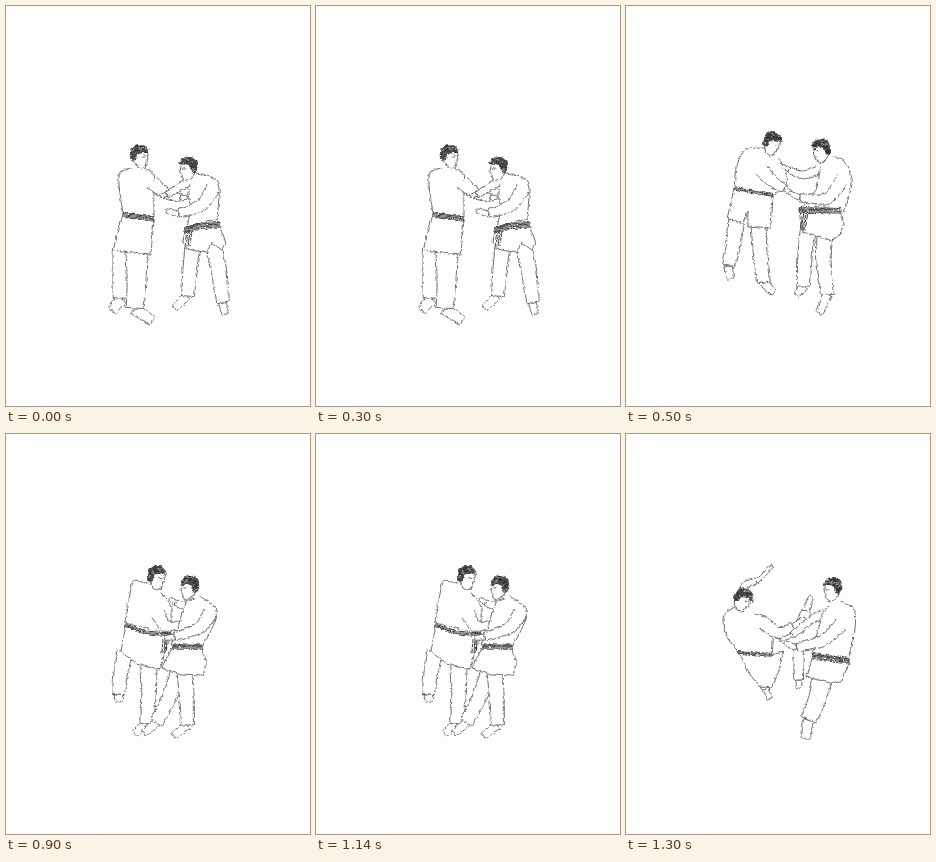
Recreate the animation shown at these times as an HTML page. Size 304x400 px, loop 1700 ms.

```html
<!DOCTYPE html>
<html lang="en">
<head>
<meta charset="utf-8">
<title>Judo throw</title>
<style>
  html, body { margin: 0; width: 100%; height: 100%; overflow: hidden; background: #fdfdfd; }
  svg { display: block; width: 100vw; height: 100vh; }
  .pose { opacity: 0; }
  path { fill: none; stroke: #666; stroke-width: .95; stroke-linecap: round; stroke-linejoin: round; }
  .ink { stroke-dasharray: 13 .9 6 1.1 21 1.4; }
  .paper { fill: #fdfdfd; stroke: none; }
  .hair { fill: #4a4a4a; stroke: none; }
  .dark { stroke: #2c2c2c; }
  .light { stroke: #ccc; stroke-width: .7; }
</style>
</head>
<body>
<svg id="stage" viewBox="0 0 304 400">
  <filter id="rough" filterUnits="userSpaceOnUse" x="0" y="0" width="304" height="400" color-interpolation-filters="sRGB">
    <feTurbulence baseFrequency=".18" numOctaves="2" seed="4"/>
    <feDisplacementMap in="SourceGraphic" scale="2" xChannelSelector="R" yChannelSelector="G"/>
  </filter>
</svg>
<script>
// Joints of each fighter. Head: place, tilt, side faced. Limbs: root, bend, end, tip.
// "back" and "front" run from neck to belt; the hem runs from the first belt end to the last.
const poses = [
  { hold: 500, fighters: [
    { head: ['133,150', 0, 1], back: '126,162 114,165 112,178 116,206', front: '138,162 147,168 147,186 147,210',
      belt: '116,208 147,212', knot: 5, hem: '106,244 135,247 144,248', trousers: 22,
      legs: ['117,245 116,268 115,292 106,304', '130,245 130,275 128,302 145,314'],
      arms: ['146,176 158,186 174,191 181,191'] },
    { head: ['182,162', 0, -1], front: '183,178 182,188 184,200 180,221', back: '190,167 206,171 213,182 211,212',
      belt: '178,224 190,220 213,218', tail: '183,224 181,240', knot: 6, hem: '176,235 180,242 201,246 205,236 215,243 219,238',
      legs: ['186,240 183,265 181,290 168,301', '207,240 213,268 216,296 218,307'],
      far: '190,172 174,180 160,188 154,190', arms: ['206,182 194,199 172,207 160,204'] }
  ]},
  { hold: 400, fighters: [
    { head: ['145,137', 22, 1], back: '138,141 119,143 111,156 108,182', front: '152,152 160,168 158,180 146,189',
      belt: '108,182 146,189', knot: 4, hem: '101,212 117,217 121,204 121,220 144,222',
      legs: ['110,212 107,236 102,259 104,272', '132,218 134,250 137,276 147,286'],
      arms: ['135,163 146,175 158,182 166,187'] },
    { head: ['195,144', -8, -1], front: '194,160 192,170 188,185 173,203', back: '207,150 219,156 225,176 217,206',
      belt: '173,203 214,204', tail: '179,205 176,224', knot: 6, hem: '176,226 188,229 204,234 214,228 217,218',
      legs: ['181,226 178,250 177,280 170,288', '198,228 197,255 201,288 193,306'],
      far: '191,164 176,168 163,163 156,160', arms: ['216,172 200,192 174,191 163,186'] }
  ]},
  { hold: 400, fighters: [
    { head: ['150,143', 8, 1], back: '141,149 127,147 122,165 119,188', front: '154,158 164,170 165,186 164,200',
      belt: '119,190 140,198 164,200', knot: 3.5, hem: '114,217 130,229 153,235',
      legs: ['119,216 114,240 112,260 113,267', '142,232 142,260 140,289 129,299'],
      arms: ['152,180 160,192 172,190 178,187'] },
    { head: ['183,153', 0, -1], front: '180,168 176,178 172,192 164,210', back: '193,162 208,172 209,184 196,211',
      belt: '166,212 195,212', tail: '158,205 157,218', knot: 5, hem: '155,234 175,240 196,241 200,228',
      legs: ['172,236 163,262 150,288 138,298', '178,238 180,265 181,291 167,301'],
      far: '190,168 178,171 169,168 164,164', arms: ['203,180 192,194 168,202 158,203'] }
  ]},
  { hold: 400, fighters: [
    { head: ['116,165', 30, 1], back: '108,172 98,180 99,198 112,218', front: '128,179 141,184 146,200 145,221',
      belt: '112,218 145,221', knot: 4, hem: '122,238 133,252 145,253 152,236 157,216', trousers: 11,
      legs: ['134,240 137,248 139,254 143,264', '172,212 172,232 172,246 172,253', '171,196 176,186 180,177 184,162'],
      far: '116,160 119,150 130,147 145,132', arms: ['136,188 152,198 166,192 178,184'] },
    { head: ['206,155', 0, -1], front: '202,172 196,180 190,200 186,220', back: '214,167 227,174 228,194 222,226',
      belt: '186,221 223,226', knot: 6, hem: '180,242 204,248 215,247', trousers: 20,
      legs: ['196,243 190,266 182,285 179,303'],
      far: '200,178 184,186 166,200 154,205', arms: ['214,190 196,206 170,213 158,208'] }
  ]}
];

const stage = document.getElementById('stage');
const parse = text => text.split(' ').map(p => p.split(',').map(Number));

function random(seed) {
  return () => (seed = seed * 16807 % 2147483647) / 2147483647;
}

function add(parent, tag, attrs) {
  const node = document.createElementNS('http://www.w3.org/2000/svg', tag);
  for (const key in attrs) node.setAttribute(key, attrs[key]);
  return parent.appendChild(node);
}

// Smooth curve through all points.
function curve(points, start = 'M') {
  const at = i => points[Math.max(0, Math.min(points.length - 1, i))];
  let d = start + points[0];
  for (let i = 0; i < points.length - 1; i++) {
    const [a, b, c, e] = [at(i - 1), at(i), at(i + 1), at(i + 2)];
    const leave = b.map((v, k) => v + (c[k] - a[k]) / 6);
    const reach = c.map((v, k) => v - (e[k] - b[k]) / 6);
    d += `C${leave} ${reach} ${c}`;
  }
  return d;
}

function outline(parent, d) {
  add(parent, 'path', { class: 'paper', d });
  add(parent, 'path', { class: 'ink', d });
}

// Both edges of a tapering tube along the points.
function edges(points, from, to) {
  const last = points.length - 1;
  const side = sign => points.map(([x, y], i) => {
    const a = points[Math.max(0, i - 1)], b = points[Math.min(last, i + 1)];
    const dx = b[0] - a[0], dy = b[1] - a[1];
    const reach = sign * (from + (to - from) * i / last) / 2 / Math.hypot(dx, dy);
    return [x - dy * reach, y + dx * reach];
  });
  return [side(1), side(-1).reverse()];
}

function drawLimb(parent, text, width, taper) {
  const [root, bend, end, tip] = parse(text);
  const [a, b] = edges([end, tip], width * taper * .7, width * taper * .5);
  outline(parent, curve([...a, tip, ...b]) + 'Z');
  const [left, right] = edges([root, bend, end], width, width * taper);
  outline(parent, curve(left) + curve(right, 'L'));
}

function drawBelt(parent, text, width, rnd) {
  const points = parse(text);
  for (let row = 0; row < width; row += 1.4) {
    const dash = Array.from({ length: 6 }, (_, i) => i % 2 ? .4 + 1.6 * rnd() : 3 + 6 * rnd());
    const d = curve(points.map(([x, y]) => [x, y + row - width / 2 + .5]));
    add(parent, 'path', { class: 'dark', d, 'stroke-width': 1.2, 'stroke-dasharray': dash.join(' ') });
  }
}

function drawHead(parent, [place, tilt, side], rnd) {
  const head = add(parent, 'g', { transform: `translate(${place}) rotate(${tilt}) scale(${side} 1)` });
  outline(head, 'M8,-5Q7,-2 9,2L7,5Q7,12 2,12Q-3,11 -6,5');
  add(head, 'path', { class: 'ink', d: 'M3,0L6,0' });
  add(head, 'path', { class: 'hair', d: 'M9,-4C9,-14 -9,-15 -9,-4Q-10,2 -7,5L-3,4L-2,-2Q3,-5 9,-4Z' });
  for (let i = 0; i < 34; i++) {
    const angle = Math.PI * (.85 + 1.1 * rnd()), reach = .55 + .45 * rnd();
    const x = 8.5 * reach * Math.cos(angle), y = 11 * reach * Math.sin(angle) - 1;
    const d = `M${x},${y}l${1 + 2 * rnd()},${2 * rnd() - 1}`;
    add(head, 'path', { class: i % 3 ? 'dark' : 'light', d });
  }
}

function drawFighter(parent, fighter, seed) {
  const { head, back, front, belt, knot, tail, hem, legs, arms, far, trousers = 16 } = fighter;
  const rnd = random(seed), waist = parse(belt), corners = parse(hem);
  legs.forEach(leg => drawLimb(parent, leg, trousers, .8));
  if (far) drawLimb(parent, far, 9, .7);
  outline(parent, curve(parse(back)) + curve(parse(front).reverse(), 'L'));
  outline(parent, 'M' + [waist[0], ...corners, waist.at(-1)].join('L'));
  drawBelt(parent, belt, knot, rnd);
  if (tail) for (const shift of [-2, 0, 2])
    add(parent, 'path', { class: 'dark', d: curve(parse(tail)), transform: `translate(${shift})`, 'stroke-dasharray': `${4 + 5 * rnd()} 1` });
  arms.forEach(arm => drawLimb(parent, arm, 14, .6));
  drawHead(parent, head, rnd);
}

const loop = poses.reduce((sum, pose) => sum + pose.hold, 0);
let start = 0;
const groups = poses.map(({ hold, fighters }, i) => {
  const node = add(stage, 'g', { class: 'pose', filter: 'url(#rough)' });
  fighters.forEach((fighter, k) => drawFighter(node, fighter, 91 + 37 * i + 500 * k));
  return { node, from: start, to: start += hold };
});

function show() {
  const time = performance.now() % loop;
  for (const { node, from, to } of groups) node.style.opacity = time >= from && time < to ? 1 : 0;
  requestAnimationFrame(show);
}
show();
</script>
</body>
</html>
```
